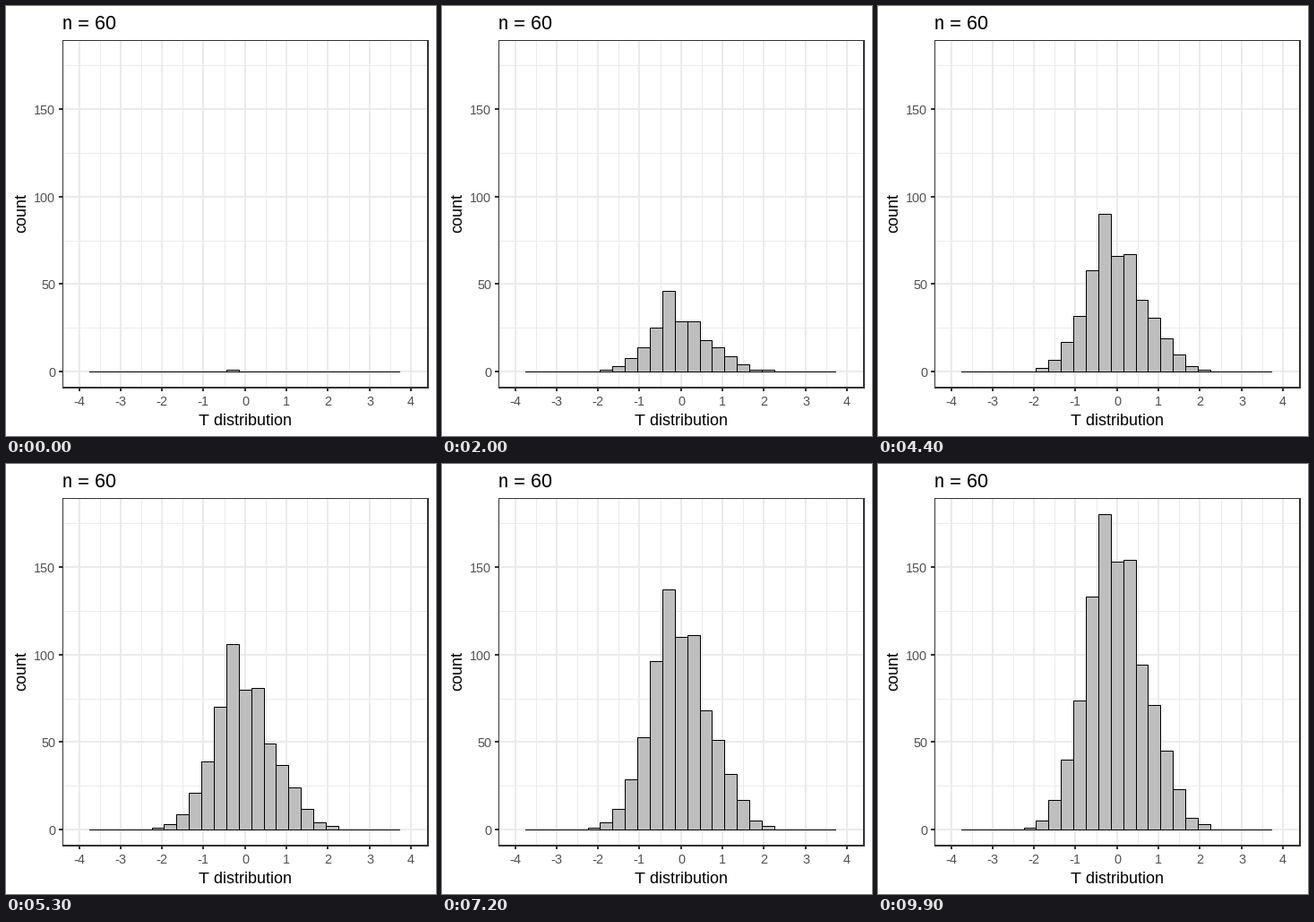
These frames come from a looping animation (480x480 px, 10000 ms). A matplotlib script:

```python
import math

import matplotlib.pyplot as plt
from matplotlib.animation import FuncAnimation
from matplotlib.patches import Rectangle

plt.rcParams.update({
    "font.family": ["Liberation Sans", "DejaVu Sans"],
    "text.hinting": "native",
    "text.hinting_factor": 1,
})

SIZE, DPI, FRAMES = 480, 96, 100
PT = 72 / DPI  # points per pixel
GRID, DARK, LABEL, FILL = "#ebebeb", "#333333", "#4d4d4d", "#bebebe"
LEFT, RIGHT, TOP, BOTTOM = 63, 472, 38, 427

SAMPLES = 1000
START, BIN = -2.25, 0.3
SHAPE = [1, 5, 17, 40, 74, 133, 180, 153, 154, 94, 71, 45, 23, 7, 3]
TALLEST = max(SHAPE)


def px(v):
    return math.floor(266.75 + 46.3 * v + 0.5)


def py(n):
    return math.floor(408.25 - 1.956 * n + 0.5)


def counts(i):
    """The mode fills a little early; the other bins share the remaining samples."""
    drawn = 1 + (SAMPLES - 1) * i / (FRAMES - 1)
    mode = math.ceil(TALLEST * (drawn / SAMPLES) ** 0.86)
    rest = (drawn - mode) / (SAMPLES - TALLEST)
    return [mode if n == TALLEST else round(n * rest) for n in SHAPE]


fig = plt.figure(figsize=(SIZE / DPI, SIZE / DPI), dpi=DPI, facecolor="white")
ax = fig.add_axes([0, 0, 1, 1])
ax.set_xlim(0, SIZE)
ax.set_ylim(SIZE, 0)
ax.axis("off")


def box(x, y, w, h, color, z):
    ax.add_patch(Rectangle((x, y), w, h, fc=color, lw=0, zorder=z))


def label(x, y, s, size, color="black", **kw):
    ax.text(x, y, s, fontsize=size * PT, color=color, va="baseline", **kw)


# Minor then major grid, with ticks
width, height = RIGHT - LEFT, BOTTOM - TOP
for k in range(-4, 4):
    box(px(k + 0.5), TOP, 1, height, GRID, 1)
for n in range(25, 200, 50):
    box(LEFT, py(n), width, 1, GRID, 1)
for v in range(-4, 5):
    box(px(v) - 1, TOP, 2, height, GRID, 2)
    box(px(v) - 1, BOTTOM, 2, 3, DARK, 6)
    label(px(v), 446, str(v), 14, LABEL, ha="center")
for n in range(0, 200, 50):
    box(LEFT, py(n) - 1, width, 2, GRID, 2)
    box(LEFT - 4, py(n) - 1, 4, 2, DARK, 6)
    label(55, py(n) + 6, str(n), 14, LABEL, ha="right")

# The panel clips its border to one pixel at the left and top
box(LEFT, TOP, 1, height, DARK, 7)
box(LEFT, TOP, width, 1, DARK, 7)
box(RIGHT - 2, TOP, 2, height, DARK, 7)
box(LEFT, BOTTOM - 2, width, 2, DARK, 7)

label(63, 26, "n = 60", 22)
label(267, 468, "T distribution", 18, ha="center")
label(22.5, 231, "count", 18, ha="center", rotation=90, rotation_mode="anchor")

# Empty bins show as a flat line along the base
box(px(-3.75), py(0), px(3.75) - px(-3.75), 1, "black", 5)

bars = []
for b in range(len(SHAPE)):
    x0, x1 = px(START + BIN * b), px(START + BIN * (b + 1))
    bar = Rectangle((x0 + 0.5, py(0) + 0.5), x1 - x0, 0, fc=FILL, ec="black",
                    lw=PT, snap=False, zorder=4)
    bars.append(ax.add_patch(bar))


def draw(i):
    for bar, n in zip(bars, counts(i)):
        bar.set_visible(n > 0)
        bar.set_height(py(n) - py(0))
    return bars


anim = FuncAnimation(fig, draw, frames=FRAMES, interval=100, repeat=True,
                     repeat_delay=0, blit=False)
plt.show()
```
